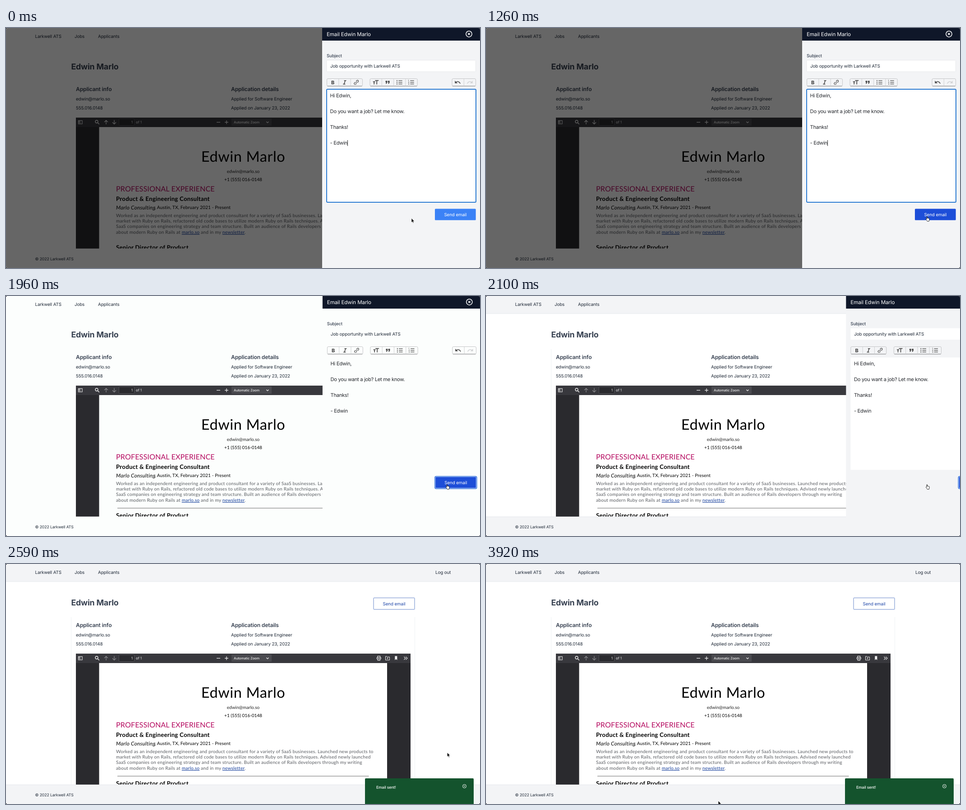
Recreate the animation shown at these times as an HTML page. Size 1051 px wide and 533 px high, loop 3990 ms.

```html
<!DOCTYPE html>
<html lang="en">
<head>
<meta charset="utf-8">
<title>Applicant email</title>
<style>
  html, body { margin: 0; width: 100%; height: 100%; overflow: hidden; background: #000; }
  svg {
    --paper: #fff; --tint: #f3f4f6; --line: #e5e7eb; --edge: #f0f1f3; --step: #8a8a8d;
    display: block; width: 100vw; height: 100vh; border-radius: 4px;
    text-rendering: geometricPrecision;
  }
  svg.flat { --paper: #fcfefd; --tint: #fcfefd; --line: #fcfefd; --edge: #fcfefd; }
  svg.dim #page { --tint: #fff; --line: #fff; --edge: #fff; --step: #eee; }
  text { font-family: Inter, "Noto Sans", sans-serif; letter-spacing: -.012em; white-space: pre; }
  .cv { font-family: Lato, "Open Sans", sans-serif; letter-spacing: .0206em; }
  .link { fill: #173f9c; text-decoration: underline; }
  .editor { letter-spacing: -.026em; }
  .paper { fill: var(--paper); }
  .tint { fill: var(--tint); }
</style>
</head>
<body>
<svg id="stage" viewBox="0 0 1051 533" preserveAspectRatio="none">
  <defs><clipPath id="viewer"><rect x="155" y="199" width="742" height="291"/></clipPath></defs>
  <g id="page"></g>
  <rect id="shade" width="1051" height="533" fill="#000" fill-opacity=".6"/>
  <g id="panel"></g>
  <g id="toast"></g>
  <path id="arrow" d="M0 0V9.4L2.2 7.5 3.6 10.7 5.1 10 3.7 6.9H6.6Z" fill="#000" stroke="#fff" stroke-width=".7"/>
  <path id="hand" d="M2.4 5.4V1c0-1.1 1.5-1.1 1.5 0v3c.2-.7 1.4-.6 1.5.2.3-.6 1.4-.5 1.5.3.3-.5 1.4-.3 1.4.6v2.6c0 1.4-.8 1.8-.8 3H3.6C3.4 9.4 2 8.3 1 6.6.4 5.6 1.5 5 2.1 5.8Z" fill="#fff" stroke="#111" stroke-width=".9"/>
</svg>
<script>
const $ = id => document.getElementById(id);
const PERSON = 'Edwin Marlo', FIRST = 'Edwin', MAIL = 'edwin@marlo.so', BRAND = 'Larkwell ATS';

// Markup helpers; text is placed by the middle of its capitals.
const text = (x, mid, size, str, attrs = '') =>
  `<text x="${x}" y="${mid + size * .36}" font-size="${size}" ${attrs}>${str}</text>`;
const rect = (x, y, w, h, attrs = '') =>
  `<rect x="${x}" y="${y}" width="${w}" height="${h}" ${attrs}/>`;
const path = (d, color, width = 1.2, attrs = '') =>
  `<path d="${d}" fill="none" stroke="${color}" stroke-width="${width}" ${attrs}/>`;
const shape = (d, color) => `<path d="${d}" fill="${color}"/>`;
const closeIcon = (x, y, r, w) =>
  `<circle cx="${x}" cy="${y}" r="${r}" fill="none" stroke="#fff" stroke-width="${w}"/>` +
  path(`M${x - r / 3} ${y - r / 3}l${r / 1.5} ${r / 1.5}m0 ${-r / 1.5}l${-r / 1.5} ${r / 1.5}`, '#fff', w);

const INK = 'fill="#1f2937"', HEAD = 'fill="#374151"', LIGHT = '#eee';

function viewerBar() {
  return rect(155, 199, 742, 21, 'fill="#38383d"') +
    path('M160.5 205.5h8.5v7.5h-8.5zM163.8 205.5v7.5', LIGHT, 1.1) +
    path('M160.5 207.5h3M160.5 209.5h3', LIGHT, .7) +
    `<circle cx="201" cy="208" r="3" fill="none" stroke="${LIGHT}" stroke-width="1.3"/>` +
    path('M203.2 210.2l3.6 3.6', LIGHT, 1.5) +
    path('M222 214v-9m-4 4l4-4 4 4M240 204.5v9m-4-4l4 4 4-4', 'var(--step)') +
    rect(250.5, 201.5, 34, 15, 'fill="#2a2a2e" stroke="#5b5b60" stroke-width=".8" rx="1"') +
    text(281, 209.3, 8, '1', `fill="${LIGHT}" text-anchor="end"`) +
    text(288, 209.3, 8, 'of 1', `fill="${LIGHT}"`) +
    path('M467 209.3h8M485 209.3h8M489 205.3v8', LIGHT, 1.3) +
    rect(500, 201, 89, 16, 'fill="#4a4a4f" rx="1"') +
    text(505, 209.2, 7.5, 'Automatic Zoom', `fill="${LIGHT}" font-weight="500" style="letter-spacing:-.02em"`) +
    path('M577.3 208l2.6 2.6 2.6-2.6', LIGHT, 1.3) +
    path('M824 207.5v-3h5.5v3M822.5 211.5v-3.6h8.6v3.6M824.3 210.5h5v3.3h-5z', LIGHT, 1.2) +
    path('M841.5 213.3v-8h3l1 1.2h5v6.8zM846 211.5v-3.5m-1.6 1.6l1.6-1.6 1.6 1.6', LIGHT, 1) +
    shape('M862.3 204.5h5v9l-2.5-2.3-2.5 2.3z', LIGHT) +
    path('M882.5 205.8l3.3 3.4-3.3 3.4m4-6.8l3.3 3.4-3.3 3.4', LIGHT, 1.2);
}

function resume() {
  const body = [
    'Worked as an independent engineering and product consultant for a variety of SaaS businesses. Launched new products to',
    'market with Ruby on Rails, refactored old code bases to utilize modern Ruby on Rails techniques. Advised newly launched',
    'SaaS companies on engineering strategy and team structure. Built an audience of Rails developers through my writing',
    'about modern Ruby on Rails at <tspan class="link">marlo.so</tspan> and in my <tspan class="link">newsletter</tspan>.'
  ];
  const mid = 'class="cv" text-anchor="middle"', bold = 'class="cv" font-weight="700"';
  return rect(155, 220, 742, 270, 'fill="#2a2a2e"') +
    rect(206.5, 220, 638.5, 270, 'class="paper"') +
    text(526, 285, 32.4, PERSON, mid) +
    text(526, 318, 10, MAIL, mid + ' fill="#222" style="letter-spacing:0"') +
    text(526, 336.5, 10, '+1 (555) 016-0148', mid + ' style="letter-spacing:0"') +
    text(244, 357, 16.1, 'PROFESSIONAL EXPERIENCE', 'class="cv" fill="#b5095f" style="letter-spacing:.008em"') +
    text(244, 379.5, 13.2, 'Product &amp; Engineering Consultant', bold) +
    text(244, 398.5, 11.7, 'Marlo Consulting', 'class="cv" font-style="italic" style="letter-spacing:.025em"') +
    text(330, 398.7, 10.2, ', Austin, TX, February 2021 - Present', 'class="cv" style="letter-spacing:.01em"') +
    body.map((s, i) => text(244, 415.9 + i * 12.45, 10.2, s, 'class="cv" fill="#595c61"')).join('') +
    path('M247 471.2H804.5', '#858585', 1.2, 'id="rule"') +
    text(244, 487.6, 13.2, 'Senior Director of Product', bold);
}

$('page').innerHTML =
  rect(0, 0, 1051, 533, 'class="paper"') +
  rect(0, 0, 1051, 39, 'class="tint"') + path('M0 39H1051', 'var(--line)', 1) +
  text(64.5, 18.7, 9.8, BRAND, INK) + text(152, 18.7, 9.8, 'Jobs', INK) +
  text(204, 18.7, 9.8, 'Applicants', INK) + text(952, 18.7, 9.8, 'Log out', INK) +
  text(144.5, 85.5, 17.8, PERSON, HEAD + ' font-weight="700"') +
  rect(815, 75.2, 91, 25.6, 'fill="none" stroke="#6585c9" stroke-width="1" rx="1"') +
  text(860.5, 88.3, 9.8, 'Send email', 'fill="#1e46a8" text-anchor="middle"') +
  path('M144.5 118V490M906.5 118V490', 'var(--edge)', 1) +
  text(155, 135.5, 12.1, 'Applicant info', HEAD + ' font-weight="600"') +
  text(155, 157, 9.8, MAIL, INK) + text(155, 177, 9.8, '555.016.0148', INK) +
  text(499, 135.5, 12.1, 'Application details', HEAD + ' font-weight="600"') +
  text(499, 157, 9.8, 'Applied for Software Engineer', INK) +
  text(499, 177, 9.8, 'Applied on January 23, 2022', INK) +
  `<g clip-path="url(#viewer)">${resume()}${viewerBar()}</g>` +
  rect(0, 490, 1051, 43, 'class="tint"') + path('M0 490.3H1051', 'var(--line)', 1) +
  text(64.5, 512.8, 8.7, '© 2022 ' + BRAND, INK) +
  text(863, 512.7, 7.4, 'Terms of Service', INK) + text(937, 512.7, 7.4, 'Privacy Policy', INK);

function editorBar() {
  const c = '#4b4b4b', cell = 26.3;
  const group = (x, n) => {
    let s = rect(x, 112.5, n * cell, 16.5, 'fill="none" stroke="#c3c4c6" rx="2.5"') +
      path(`M${x + 1} 129h${n * cell - 2}`, '#8f9092', 1);
    for (let i = 1; i < n; i++) s += path(`M${x + i * cell} 112.5v16.5`, '#cfd0d2', 1);
    return s;
  };
  const rows = [116.8, 120.6, 124.4];
  const list = x => path(rows.map(y => `M${x} ${y}h8.5`).join(''), c, 1.3);
  const quote = x => shape(`M${x} 117.3h3.8v3.6l-1.7 3.2h-1.9l1.4-3h-1.6z`, c);
  return group(711.5, 3) + group(807, 4) + group(989, 2) +
    text(724.7, 120.8, 11, 'B', `fill="${c}" font-weight="800" text-anchor="middle"`) +
    path('M749.5 116.8h5M747.3 124.6h5M752.2 116.8l-2.6 7.8', c, 1.6) +
    `<g transform="translate(776.7 120.7) rotate(-45)">` +
    path('M-1.2 -2.1h-2.6a2.1 2.1 0 0 0 0 4.2h2.6M1.2 -2.1h2.6a2.1 2.1 0 0 1 0 4.2h-2.6M-2.3 0h4.6', c, 1.2) + '</g>' +
    path('M818.2 116.6h8M822.2 116.6v8.6M813.7 119.4h5M816.2 119.4v5.8', c, 1.7) +
    quote(841.6) + quote(846.8) +
    list(870.2) + rows.map(y => `<circle cx="867" cy="${y}" r="1.1" fill="${c}"/>`).join('') +
    list(896.2) + rows.map((y, i) => text(891.6, y, 4.2, i + 1, `fill="${c}" font-weight="600"`)).join('') +
    path('M997.3 120.8c3-2.8 8-2.4 9.8 2.7', c, 1.6) + shape('M995.3 117v5.8h5.8z', c) +
    path('M1032.7 120.8c-3-2.8-8-2.4-9.8 2.7', '#d2d3d5', 1.6) + shape('M1034.7 117v5.8h-5.8z', '#d2d3d5');
}

const letter = (mid, s, attrs = '') => text(718.6, mid, 11.2, s, 'class="editor" fill="#24272c" ' + attrs);
$('panel').innerHTML =
  rect(701, 0, 350, 533, 'class="tint"') + rect(701, 0, 350, 28, 'fill="#0f1729"') +
  text(711, 13.8, 11.6, 'Email ' + PERSON, 'fill="#fff"') + closeIcon(1026.5, 13.3, 6.6, 1.5) +
  text(711, 61.3, 9.6, 'Subject', HEAD + ' font-weight="500"') +
  rect(711, 71.5, 330.5, 25.5, 'id="field" class="paper" stroke="#e8e9ec" rx="1"') +
  text(719, 84.4, 9.8, 'Job opportunity with ' + BRAND, INK) +
  editorBar() +
  rect(711, 136.5, 330.5, 249.5, 'class="paper"') +
  rect(711, 136, 331, 251, 'id="focus" fill="none" stroke="#2a7ad2" stroke-width="2" rx="2"') +
  letter(150.2, `Hi ${FIRST},`) + letter(185.3, 'Do you want a job? Let me know.') +
  letter(220.4, 'Thanks!') + letter(255.4, '- ' + FIRST, 'id="sign"') +
  rect(755, 249, 1, 13, 'id="caret" fill="#222"') +
  rect(951, 401.5, 90.7, 25.3, 'id="send" rx="1.5"') +
  `<g id="ring" fill="none">` +
  rect(951, 401.5, 91, 25.5, 'stroke="#e4edff" stroke-width="1" rx="2"') +
  rect(950, 400.5, 93, 27.5, 'stroke="#3474dc" stroke-width="1.5" rx="3"') + '</g>' +
  text(996.4, 414.5, 9.8, 'Send email', 'fill="#fff" text-anchor="middle"');

$('toast').innerHTML =
  rect(796, 476, 241, 62, 'fill="#14532d" rx="2"') +
  text(821, 496.4, 8.6, 'Email sent!', 'fill="#fff" font-weight="500"') + closeIcon(1016.5, 493.5, 4, 1);

// Pointer tip: time, x, y
const TRAIL = [
  [0, 899, 422.5], [70, 900, 424], [140, 912, 430], [210, 931, 433], [280, 950, 431], [350, 969, 426],
  [420, 975.6, 423.5], [560, 975.6, 423.5], [840, 977.8, 418.5], [2450, 977.8, 418.5], [2520, 978.3, 418.7],
  [3150, 978.3, 418.7], [3220, 972, 421], [3290, 945, 427], [3360, 895, 439], [3640, 645, 488],
  [3710, 593, 497.5], [3780, 556, 510], [3850, 528, 521], [3920, 515, 526]
];
const LOOP = 3990, STEP = 70;

function pointer(t) {
  const i = TRAIL.findIndex(p => p[0] > t);
  if (i < 0) return TRAIL[TRAIL.length - 1].slice(1);
  const [a, b] = [TRAIL[i - 1], TRAIL[i]], k = (t - a[0]) / (b[0] - a[0]);
  return [1, 2].map(n => a[n] + (b[n] - a[n]) * k);
}

// cubic-bezier(.4, 0, .2, 1)
function ease(p) {
  if (p <= 0) return 0;
  if (p >= 1) return 1;
  let lo = 0, hi = 1, u;
  for (let i = 0; i < 24; i++) {
    u = (lo + hi) / 2;
    const v = 1 - u, x = 1.2 * u * v * v + .6 * u * u * v + u ** 3;
    if (x < p) lo = u; else hi = u;
  }
  return u * u * (3 - 2 * u);
}

const show = (id, on) => $(id).setAttribute('visibility', on ? 'visible' : 'hidden');
const move = (id, x, y) => $(id).setAttribute('transform', `translate(${x} ${y})`);

function render(t) {
  const open = t < 1960, clicked = t >= 1750, hover = t >= 350, gone = t >= 2520;
  const hand = hover && !gone;
  const [x, y] = pointer(t);
  $('stage').classList.toggle('dim', open);
  $('stage').classList.toggle('flat', t >= 1960 && t < 2030);
  show('shade', open);
  show('rule', !open);
  show('panel', !gone);
  show('focus', !clicked);
  show('ring', clicked && !gone);
  show('caret', t < 350 || (t >= 910 && t < 1400));
  $('field').setAttribute('stroke-opacity', clicked ? 0 : 1);
  $('send').setAttribute('fill', hover ? '#1d4ed8' : '#3b82f6');
  move('panel', 350 * ease((t - 1940) / 600), 0);
  move('toast', 0, 58 * (1 - ease((t - 2280) / 310)));
  move('arrow', x, y);
  move('hand', x - 3.1, y);
  show('arrow', !hand);
  show('hand', hand);
}

$('caret').setAttribute('x', 718.6 + $('sign').getComputedTextLength());
const start = performance.now();
function tick() {
  const t = (performance.now() - start) % LOOP;
  render(Math.floor(t / STEP) * STEP);
  requestAnimationFrame(tick);
}
tick();
</script>
</body>
</html>
```
